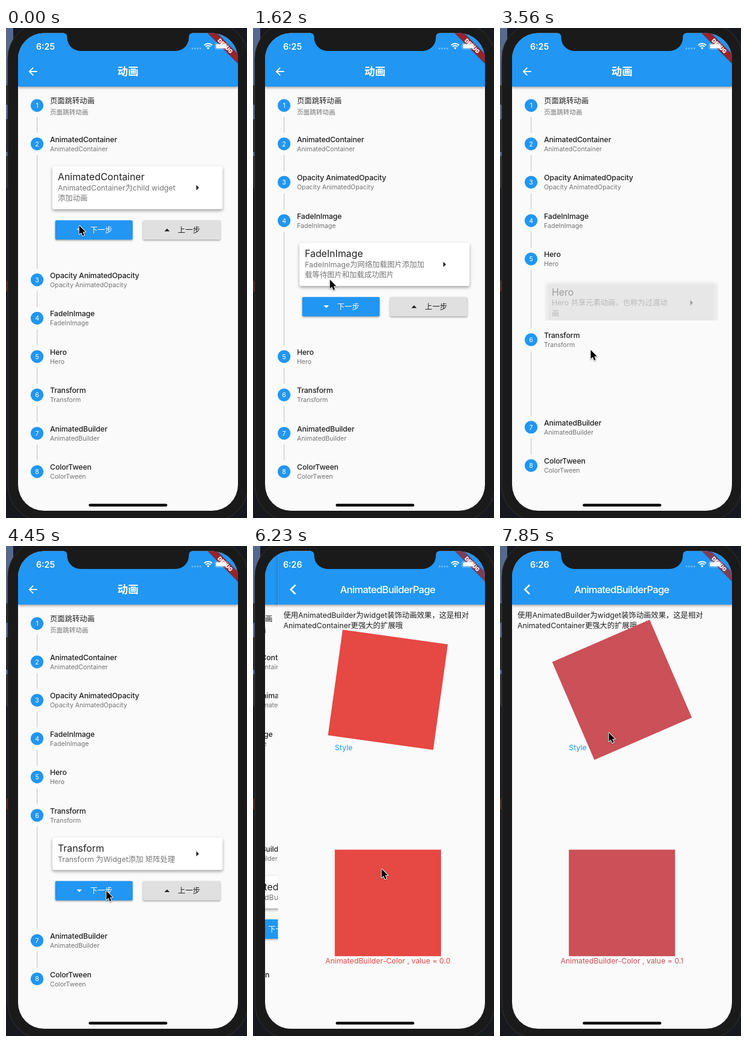
Animation of 400x811 px, one loop 8000 ms. Source, as an HTML page with a canvas:

```html
<!DOCTYPE html>
<html lang="zh-CN">
<head>
<meta charset="utf-8">
<title>动画</title>
<style>
html, body { margin: 0; width: 100%; height: 100%; overflow: hidden; background: #1a1a1a; }
canvas { display: block; width: 400px; height: 811px; }
</style>
</head>
<body>
<canvas id="stage"></canvas>
<script>
const canvas = document.getElementById('stage');
const ctx = canvas.getContext('2d');
const ratio = window.devicePixelRatio || 1;
canvas.width = 400 * ratio;
canvas.height = 811 * ratio;

const LOOP = 8000, TICK = LOOP / 54;
const SCREEN = { x: 20, y: 8.5, w: 365, h: 790.5 };
const FAMILY = 'Inter, "Noto Sans CJK SC", "Noto Sans CJK", sans-serif';
const BLUE = '#2196f3', PAPER = '#fafafa';
const INK = 'rgba(0,0,0,.87)', MUTED = 'rgba(0,0,0,.54)';

const STEPS = [
  { title: '页面跳转动画', lines: [''] },
  { title: 'AnimatedContainer', lines: ['AnimatedContainer为child widget', '添加动画'] },
  { title: 'Opacity AnimatedOpacity', lines: ['AnimatedOpacity为child widget', '添加透明度动画'] },
  { title: 'FadeInImage', lines: ['FadeInImage为网络加载图片添加加', '载等待图片和加载成功图片'] },
  { title: 'Hero', lines: ['Hero 共享元素动画，也称为过渡动', '画'] },
  { title: 'Transform', lines: ['Transform 为Widget添加 矩阵处理'] },
  { title: 'AnimatedBuilder', lines: ['AnimatedBuilder 动画构建者'] },
  { title: 'ColorTween', lines: [''] }
];
const FIRST_OPEN = 1;
const TAPS = [500, 1120, 2050, 3480, 4480];
const FADE = 200;
const CLOCK_CHANGE = 5480;
const PUSH = 6002, PUSH_TIME = 400, SPIN_TIME = 10000;

// time, x, y of the pointer tip
const POINTER = [
  [0, 121, 326], [200, 121, 326], [290, 121, 326.6], [720, 121, 327],
  [1020, 123, 391], [1320, 124, 392], [1620, 127, 414],
  [1900, 131, 460], [2220, 133, 464], [2520, 143, 501], [2667, 143, 529],
  [2820, 154, 570], [2970, 158, 580], [3260, 150, 532], [3600, 150, 532],
  [4000, 165, 568], [4300, 166, 570], [5040, 166, 570],
  [5330, 182, 621], [5640, 220, 577], [5778, 221, 575], [6100, 221, 575],
  [6667, 183, 382], [7111, 181, 336], [7852, 180, 308]
];

const clamp = v => Math.max(0, Math.min(1, v));
const mix = (a, b, p) => a + (b - a) * p;

function bezier(x1, y1, x2, y2) {
  const at = (a, b, s) => 3 * a * s * (1 - s) ** 2 + 3 * b * s * s * (1 - s) + s ** 3;
  return x => {
    if (x <= 0 || x >= 1) return clamp(x);
    let lo = 0, hi = 1;
    for (let i = 0; i < 24; i++) {
      const mid = (lo + hi) / 2;
      if (at(x1, x2, mid) < x) lo = mid; else hi = mid;
    }
    return at(y1, y2, lo);
  };
}
const sizeEase = bezier(.4, 0, .2, 1);
const pushEase = bezier(.35, .91, .33, .97);

function text(str, x, y, size, color, { weight = 400, align = 'left', spacing = 0 } = {}) {
  ctx.font = `${weight} ${size}px ${FAMILY}`;
  ctx.letterSpacing = spacing + 'px';
  ctx.textAlign = align;
  ctx.textBaseline = 'alphabetic';
  ctx.fillStyle = color;
  ctx.fillText(str, x, y);
}

function rect(x, y, w, h, color) {
  ctx.fillStyle = color;
  ctx.fillRect(x, y, w, h);
}

function box(x, y, w, h, r, color) {
  ctx.beginPath();
  ctx.roundRect(x, y, w, h, r);
  ctx.fillStyle = color;
  ctx.fill();
}

function shape(points, color) {
  ctx.beginPath();
  points.forEach(([x, y]) => ctx.lineTo(x, y));
  ctx.closePath();
  ctx.fillStyle = color;
  ctx.fill();
}

function line(points, width, color) {
  ctx.beginPath();
  points.forEach(([x, y]) => ctx.lineTo(x, y));
  ctx.lineWidth = width;
  ctx.strokeStyle = color;
  ctx.stroke();
}

function raised(blur, dy, alpha, draw) {
  ctx.save();
  ctx.shadowColor = `rgba(0,0,0,${alpha})`;
  ctx.shadowBlur = blur * ratio;
  ctx.shadowOffsetY = dy * ratio;
  draw();
  ctx.restore();
}

function shifted(dx, draw) {
  ctx.save();
  ctx.translate(dx, 0);
  draw();
  ctx.restore();
}

function drawDesk() {
  rect(0, 0, 400, 811, '#17191f');
  rect(0, 0, 12, 95, '#55698f');
  rect(0, 95, 4, 32, '#2b2c30');
  rect(0, 127, 4, 24, '#5a6f9a');
  rect(0, 151, 4, 54, '#2b2c30');
  rect(0, 205, 4, 7, '#5a6f9a');
  rect(0, 212, 4, 53, '#333336');
  rect(0, 418, 4, 18, '#53291f');
  box(3, -9, 399, 825, 59, '#1a1a1a');
  ctx.lineWidth = 1;
  ctx.strokeStyle = '#333';
  ctx.stroke();
}

function drawBar() {
  raised(4, 2, .35, () => rect(20, 0, 365, 97, BLUE));
}

function drawBanner() {
  ctx.save();
  ctx.translate(385, 8.5);
  ctx.rotate(Math.PI / 4);
  rect(-36, 24.2, 72, 11.6, 'rgba(0,0,0,.2)');
  rect(-36, 24.7, 72, 10.6, 'rgba(183,28,28,.63)');
  text('DEBUG', 0, 33.2, 8.8, '#fff', { weight: 900, align: 'center' });
  ctx.restore();
}

function drawButton(x, y, label, up, fill, ink) {
  raised(3, 1.5, .35, () => box(x, y, 128.5, 32, 2, fill));
  const cx = x + 40, cy = y + 16, d = up ? -1 : 1;
  shape([[cx - 4.4, cy - 2.2 * d], [cx + 4.4, cy - 2.2 * d], [cx, cy + 2.2 * d]], ink);
  text(label, x + 58, cy + 4.6, 12.34, ink, { weight: 500 });
}

function drawContent(step, y) {
  const height = step.lines.length > 1 ? 71.5 : 53.8;
  const top = y + 36.7, middle = top + height / 2;
  raised(5, 2.5, .36, () => box(77, top, 282.5, height, 3.5, '#fff'));
  text(step.title, 86, y + 60.3, 15.87, INK);
  step.lines.forEach((str, i) => text(str, 86, y + 77 + i * 17.6, 12.34, MUTED));
  shape([[315.8, middle - 4.4], [320.2, middle], [315.8, middle + 4.4]], INK);
  const row = top + height + 18.3;
  drawButton(81.7, row, '下一步', false, BLUE, '#fff');
  drawButton(227.3, row, '上一步', true, '#e0e0e0', INK);
}

// How far a step is unfolded, and how visible its content is.
function stepState(i, t) {
  const since = n => n < 0 ? 1 : clamp((t - (TAPS[n] ?? Infinity)) / FADE);
  const n = i - FIRST_OPEN;
  if (n < 0 || n > TAPS.length) return { size: 0, alpha: 0 };
  const opened = since(n - 1), closed = since(n);
  return {
    size: sizeEase(opened) - sizeEase(closed),
    alpha: clamp((opened - .4) / .6) * clamp(1 - closed / .6)
  };
}

function drawListPage(t) {
  rect(20, 0, 365, 811, PAPER);
  let y = 128.3;
  STEPS.forEach((step, i) => {
    const { size, alpha } = stepState(i, t);
    const full = step.lines.length > 1 ? 161.5 : 143.7;
    const next = y + 63.5 + full * size;
    const cjk = i === 0;
    ctx.beginPath();
    ctx.arc(51.6, y, 10.6, 0, 7);
    ctx.fillStyle = BLUE;
    ctx.fill();
    text(String(i + 1), 51.6, y + 3.8, 10.6, '#fff', { align: 'center' });
    if (i < STEPS.length - 1) rect(51.2, y + 18.5, 1, next - y - 37, '#bdbdbd');
    text(step.title, 73, y - (cjk ? 3.6 : 3), 12.34, INK, { weight: 500, spacing: cjk ? 0 : -.15 });
    text(step.title, 73, y + (cjk ? 14.4 : 12), 10.58, MUTED);
    if (alpha > 0) {
      ctx.save();
      ctx.beginPath();
      ctx.rect(20, y + 31.7, 365, full * size);
      ctx.clip();
      ctx.globalAlpha = alpha;
      drawContent(step, y);
      ctx.restore();
    }
    y = next;
  });
  drawBar();
  line([[51.7, 72], [39.5, 72]], 1.8, '#fff');
  line([[45.2, 65.6], [38.8, 72], [45.2, 78.4]], 1.8, '#fff');
  text('动画', 202.5, 78.4, 17.4, '#fff', { weight: 600, align: 'center' });
  drawBanner();
}

function drawBuilderPage(t) {
  const value = (t - PUSH) / SPIN_TIME;
  const shown = Math.floor(value * 10) / 10;
  const [r, g, b] = [[230, 72, 67], [-40, 152, 277]]
    .reduce((from, to) => from.map((c, i) => Math.round(mix(c, to[i], shown))));
  const color = `rgb(${r},${g},${b})`;
  const side = 176.3;

  rect(20, 0, 365, 811, PAPER);
  drawBar();
  line([[49, 64.4], [41.4, 72], [49, 79.6]], 2.7, '#fff');
  text('AnimatedBuilderPage', 202, 78, 16.5, '#fff', { weight: 500, align: 'center', spacing: -.68 });
  text('使用AnimatedBuilder为widget装饰动画效果，这是相对', 29, 118.6, 12.34, INK);
  text('AnimatedContainer更强大的扩展哦', 29, 136.4, 12.34, INK);
  ctx.save();
  ctx.translate(202.5, 238);
  ctx.rotate(value * 2 * Math.PI);
  rect(-side / 2, -side / 2, side, side, color);
  ctx.restore();
  text('Style', 114.3, 337.6, 12.34, BLUE);
  rect(114.3, 502.6, side, side, color);
  text('AnimatedBuilder-Color , value = ' + shown.toFixed(1), 202.5, 690.8, 12.34, color, { align: 'center' });
}

function drawStatus(t) {
  text(t < CLOCK_CHANGE ? '6:25' : '6:26', 50, 35.6, 14.2, '#fff', { weight: 600 });
  for (let i = 0; i < 4; i++) {
    box(308 + i * 4.4, 32.6, 2.8, 2.8, 1.4, 'rgba(255,255,255,.38)');
  }
  ctx.lineWidth = 2;
  ctx.strokeStyle = '#fff';
  for (const r of [9.2, 5.8]) {
    ctx.beginPath();
    ctx.arc(335.5, 35, r, -Math.PI * .75, -Math.PI * .25);
    ctx.stroke();
  }
  shape([[335.5, 35.6], [333.2, 32.8], [335.5, 31.8], [337.8, 32.8]], '#fff');
  ctx.beginPath();
  ctx.roundRect(347, 25.3, 20.6, 10, 2.6);
  ctx.lineWidth = .9;
  ctx.strokeStyle = 'rgba(255,255,255,.45)';
  ctx.stroke();
  box(348.5, 26.8, 17.6, 7, 1.4, '#fff');
  box(368.6, 28.6, 1.2, 3.5, .6, 'rgba(255,255,255,.5)');
}

function drawNotch() {
  ctx.beginPath();
  ctx.moveTo(96, 7);
  ctx.lineTo(96, 8.5);
  ctx.quadraticCurveTo(101.5, 9, 101.5, 15);
  ctx.arcTo(101.5, 38, 125, 38, 22);
  ctx.arcTo(303.5, 38, 303.5, 15, 22);
  ctx.lineTo(303.5, 15);
  ctx.quadraticCurveTo(303.5, 9, 309, 8.5);
  ctx.lineTo(309, 7);
  ctx.fillStyle = '#1a1a1a';
  ctx.fill();
}

function drawPointer(t) {
  const n = POINTER.findIndex(p => p[0] > t);
  const b = POINTER[n < 0 ? POINTER.length - 1 : n];
  const a = n < 0 ? b : POINTER[n - 1];
  const p = a === b ? 0 : (t - a[0]) / (b[0] - a[0]);
  ctx.save();
  ctx.translate(mix(a[1], b[1], p) + .6, mix(a[2], b[2], p) + .8);
  ctx.lineJoin = 'round';
  const arrow = [[0, 0], [0, 14.8], [3.3, 11.8], [5.7, 17.3], [8.2, 16.2], [5.9, 10.8], [10.4, 10.8], [0, 0]];
  raised(2, 1, .4, () => line(arrow, 2, '#fff'));
  shape(arrow, '#000');
  ctx.restore();
}

function draw(t) {
  ctx.setTransform(ratio, 0, 0, ratio, 0, 0);
  drawDesk();
  ctx.save();
  ctx.beginPath();
  ctx.roundRect(SCREEN.x, SCREEN.y, SCREEN.w, SCREEN.h, 43);
  ctx.clip();
  const pushed = pushEase((t - PUSH) / PUSH_TIME);
  if (pushed < 1) shifted(-pushed * SCREEN.w / 3, () => drawListPage(t));
  if (pushed > 0) shifted((1 - pushed) * SCREEN.w, () => drawBuilderPage(t));
  drawBanner();
  drawStatus(t);
  box(137.3, 787.5, 130.4, 4.5, 2.25, '#000');
  ctx.restore();
  drawNotch();
  drawPointer(t);
}

const start = performance.now();
function frame() {
  const t = (performance.now() - start) % LOOP;
  draw(Math.min(53, Math.floor((t + 14) / TICK)) * TICK);
  requestAnimationFrame(frame);
}
frame();
</script>
</body>
</html>
```
